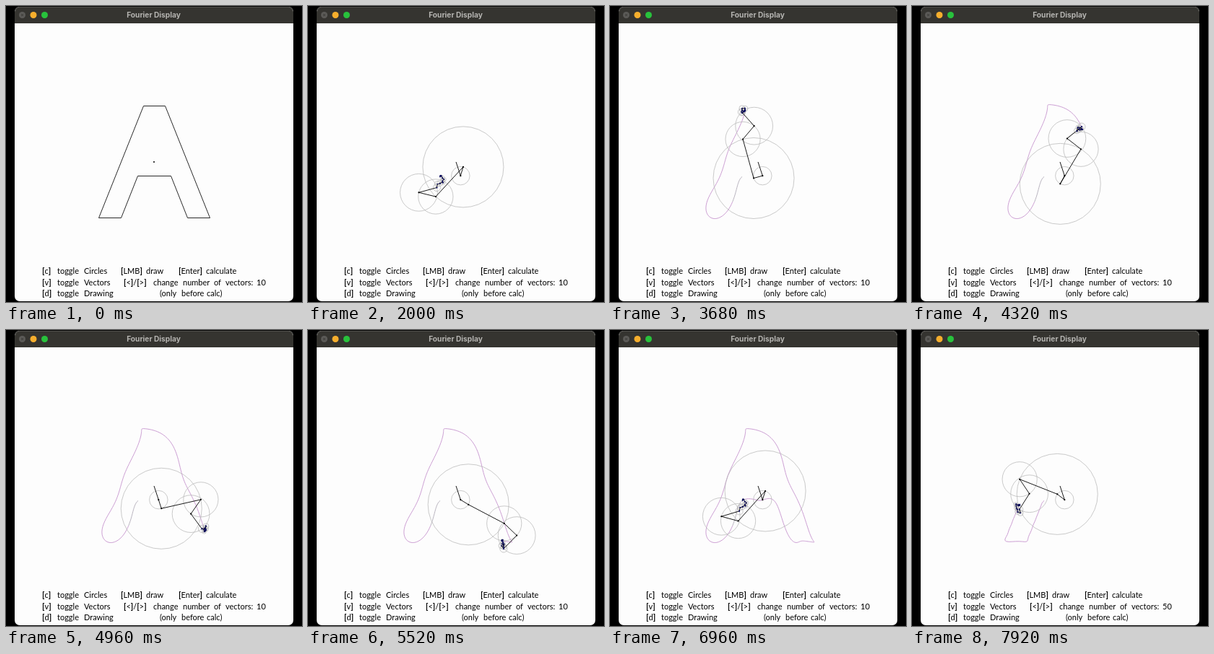
Animation, 410 px wide and 410 px high, one loop 8 s. Source, as an HTML page with a canvas:

```html
<!DOCTYPE html>
<html lang="en">
<head>
<meta charset="utf-8">
<title>Fourier Display</title>
<style>
  html, body { margin: 0; width: 100%; height: 100%; overflow: hidden; background: #000; }
  svg, canvas { position: absolute; left: 0; top: 0; width: 410px; height: 410px; }
  .title { font: 700 10.2px Inter, Roboto, sans-serif; fill: #b5b4b1; text-anchor: middle; }
  .help { font: 400 11px Lato, "Open Sans", sans-serif; fill: #000; }
  .bracket { font-weight: 700; }
</style>
</head>
<body>
<svg viewBox="0 0 410 410">
  <rect x="12" y="1" width="386" height="408" rx="7" fill="#fdfdfd"/>
  <path d="M12 24V8a7 7 0 0 1 7-7H391a7 7 0 0 1 7 7V24Z" fill="#353430"/>
  <path d="M13 7a6 6 0 0 1 6-5.5H391a6 6 0 0 1 6 5.5" fill="none" stroke="#5a5955" stroke-width=".8"/>
  <circle cx="22.5" cy="12.5" r="4.5" fill="#5b5a57"/>
  <path d="M21 11l3 3m0-3l-3 3" stroke="#33322f" stroke-width=".9"/>
  <circle cx="38" cy="12.5" r="4.5" fill="#f6ae2d"/>
  <circle cx="53.5" cy="12.5" r="4.5" fill="#28c23c"/>
  <text class="title" x="204.5" y="16">Fourier Display</text>
  <g id="help" class="help"></g>
</svg>
<canvas id="stage" width="410" height="410"></canvas>
<script>
const LOOP = 8000, START = 2000, CYCLE = 4970, MORE = 7040;
const TAU = Math.PI * 2, MAX = 50, STEP = 0.004;

const rows = [
  [371, "50 [c]|71 toggle|108 Circles|159 [LMB]|194 draw|239 [Enter]|277 calculate"],
  [386.5, "50 [v]|71 toggle|108 Vectors|163 [<]/[>]|204 change|245 number|288 of|304 vectors:|347 10"],
  [402, "50 [d]|71 toggle|108 Drawing|213 (only|243 before|278 calc)"]
];

function svgNode(name, content, parent) {
  const node = document.createElementNS("http://www.w3.org/2000/svg", name);
  node.textContent = content;
  return parent.appendChild(node);
}

const help = document.getElementById("help");
for (const [y, words] of rows) {
  for (const item of words.split("|")) {
    const [x, word] = item.split(" ");
    const text = svgNode("text", "", help);
    text.setAttribute("x", x);
    text.setAttribute("y", y);
    for (const part of word.split(/([[\]])/)) {
      const span = svgNode("tspan", part, text);
      if (part === "[" || part === "]") span.setAttribute("class", "bracket");
    }
    if (word === "10") text.id = "count";
  }
}
const count = document.getElementById("count");

// Letter outline: phase, x, y (repeated points are pauses of the pen)
const knots = [
  [0.008, 182, 235], [0.085, 159, 293], [0.09, 159, 293], [0.118, 128, 293],
  [0.345, 190, 138], [0.402, 190, 138], [0.425, 220, 138],
  [0.615, 282, 293], [0.655, 282, 293], [0.785, 251, 293],
  [0.855, 228, 235], [1.008, 182, 235]
];

function outline(p) {
  if (p < knots[0][0]) p += 1;
  const i = knots.findIndex(k => k[0] > p);
  const [t0, x0, y0] = knots[i - 1], [t1, x1, y1] = knots[i];
  const f = (p - t0) / (t1 - t0);
  return [x0 + (x1 - x0) * f, y0 + (y1 - y0) * f];
}

function coefficient(k, samples = 1000) {
  let re = 0, im = 0;
  for (let i = 0; i < samples; i++) {
    const [x, y] = outline(i / samples), a = -TAU * k * i / samples;
    re += x * Math.cos(a) - y * Math.sin(a);
    im += x * Math.sin(a) + y * Math.cos(a);
  }
  return { k, r: Math.hypot(re, im) / samples, a: Math.atan2(im, re) };
}

const mean = coefficient(0);
const mx = mean.r * Math.cos(mean.a), my = mean.r * Math.sin(mean.a);
const vectors = [];
for (let k = 1; k <= MAX; k++) vectors.push(coefficient(-k), coefficient(k));

function chain(p, n) {
  let x = mx, y = my;
  const joints = [[x, y]];
  for (const v of vectors.slice(0, 2 * n)) {
    const a = v.a + TAU * v.k * p;
    joints.push([x += v.r * Math.cos(a), y += v.r * Math.sin(a)]);
  }
  return joints;
}

const vectorCount = t => t < MORE ? 10 : Math.min(MAX, 20 + 10 * Math.floor((t - MORE) / 40));

const g = document.getElementById("stage").getContext("2d");
g.lineJoin = "round";

function line(points, color, width) {
  g.beginPath();
  for (const [x, y] of points) g.lineTo(x, y);
  g.strokeStyle = color;
  g.lineWidth = width;
  g.stroke();
}

function dot(x, y, r, color) {
  g.beginPath();
  g.arc(x, y, r, 0, TAU);
  g.fillStyle = color;
  g.fill();
}

function drawTrace(cycle, p) {
  const points = [];
  const pen = q => chain(q, vectorCount(START + (cycle + q) * CYCLE)).pop();
  for (let q = 0; q < p; q += STEP) points.push(pen(q));
  points.push(pen(p));
  const tail = cycle ? 0 : Math.round(0.055 / STEP);
  line(points.slice(0, tail + 1), "#a9a2b0", 0.8);
  line(points.slice(tail), "#c795cf", 0.9);
}

function drawVectors(p, n) {
  const joints = chain(p, n);
  g.strokeStyle = "#b4b4b4";
  g.lineWidth = 0.7;
  for (let i = 0; i < 2 * n; i++) {
    if (vectors[i].r < 0.6) continue;
    g.beginPath();
    g.arc(...joints[i], vectors[i].r, 0, TAU);
    g.stroke();
  }
  line([[205, 216], ...joints], "#000", 0.9);
  joints.forEach(([x, y], i) => dot(x, y, i < 5 ? 1.1 : 0.9, i < 4 ? "#000" : "#0a0a60"));
}

function draw(t) {
  g.clearRect(0, 0, 410, 410);
  count.textContent = vectorCount(t);
  if (t < START) {
    line(knots.map(([, x, y]) => [x + 0.5, y + 0.5]), "#111", 0.9);
    dot(205, 216, 1, "#000");
    return;
  }
  const turns = (t - START) / CYCLE, cycle = Math.floor(turns), p = turns - cycle;
  drawTrace(cycle, p);
  drawVectors(p, vectorCount(t));
}

function frame() {
  draw(performance.now() % LOOP);
  requestAnimationFrame(frame);
}
frame();
</script>
</body>
</html>
```
